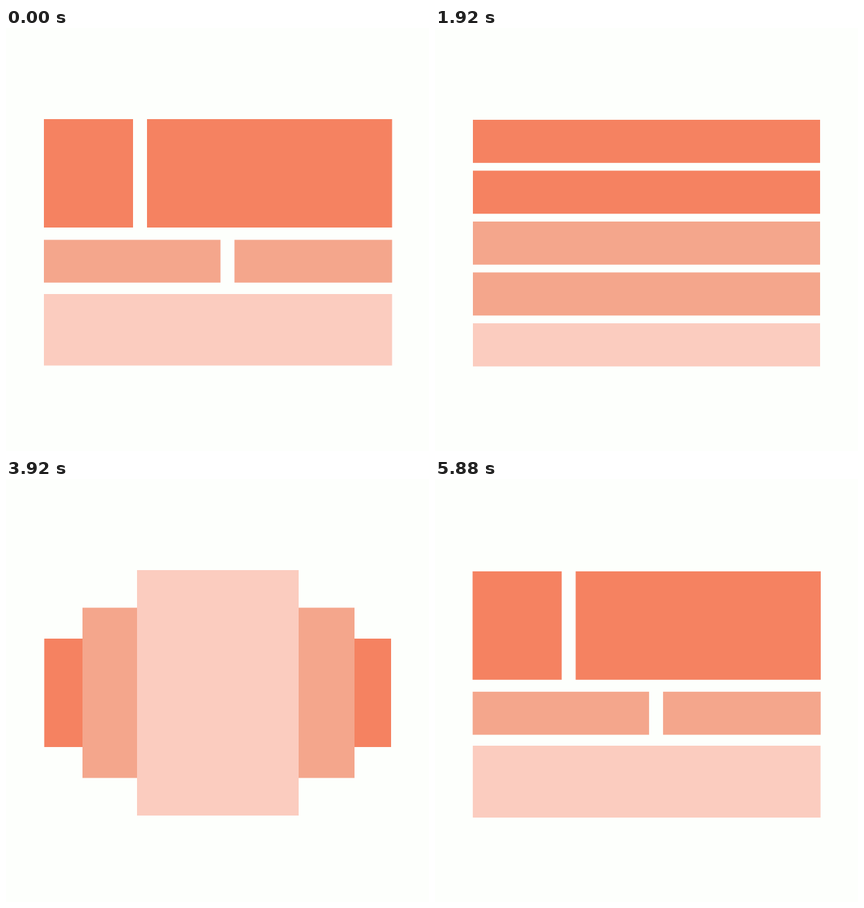
These frames come from a looping animation (636x636 px, 5.92 s). An HTML page with a canvas:

```html
<!DOCTYPE html>
<html lang="en">
<head>
<meta charset="utf-8">
<title>Layout shuffle</title>
<style>
  html, body { margin: 0; width: 100%; height: 100%; overflow: hidden; background: #fdfffc; }
  canvas { display: block; }
</style>
</head>
<body>
<canvas id="stage" width="636" height="636"></canvas>
<script>
const ctx = document.getElementById('stage').getContext('2d');
const LOOP = 5920, STEP = 40, MOVE = 760;
const DARK = '#f58261', MID = '#f4a68c', LIGHT = '#fbccbf';
const colors = [DARK, DARK, MID, MID, LIGHT];

// Layout: a box is [left, top, right, bottom].
const LEFT = 57, RIGHT = 580.5, MIDDLE = 321.5, GAP = 21;
const box = (left, right, top, height) => [left, top, right, top + height];
const split = (cut, top, height) => [
  box(LEFT, cut - GAP / 2, top, height),
  box(cut + GAP / 2, RIGHT, top, height)
];
const centred = (left, right, height) => box(left, right, MIDDLE - height / 2, height);

const grid = [...split(201.5, 137, 163), ...split(333, 318.5, 64.3), box(LEFT, RIGHT, 400, 107.5)];
const rows = [0, 1, 3, 2, 4].map(i => box(LEFT, RIGHT - 1.5, 138 + 76.5 * i, 64.8));
const stack = [
  centred(LEFT + 0.5, 191, 163), centred(210, RIGHT - 1.5, 163),
  centred(115, 259, 256), centred(290, 524, 256),
  centred(197, 440, 369)
];
const settled = grid.map(([l, t, r, b]) => [l - 0.5, t + 1.6, r - 0.5, b + 1.6]);

// In each move one box also stretches: burst is a short widening,
// wide, tall and shift swell and fade more slowly.
const moves = [
  { start: 1163, from: grid, to: rows, who: 4, burst: 18, wide: 0, tall: 3, shift: 0 },
  { start: 3163, from: rows, to: stack, who: 3, burst: 60, wide: 2, tall: 13, shift: 35 },
  { start: 5157, from: stack, to: settled, who: 4, burst: 0, wide: -10, tall: 23.5, shift: 0 }
];

// cubic-bezier(1, 0, .38, 1)
function ease(x) {
  if (x <= 0) return 0;
  if (x >= 1) return 1;
  let lo = 0, hi = 1;
  for (let i = 0; i < 24; i++) {
    const s = (lo + hi) / 2, q = 1 - s;
    if (3 * s * q * q + 1.14 * s * s * q + s * s * s < x) lo = s; else hi = s;
  }
  return lo * lo * (3 - 2 * lo);
}

const quick = t => t < 400 ? Math.sin(Math.PI * t / 400) ** 2 : 0;
const slow = t => t < 700 ? Math.sin(Math.PI * (t / 700) ** 0.6) : 0;

function stretch([l, t, r, b], move, time) {
  const s = slow(time);
  const dx = move.burst * quick(time) + move.wide * s, dy = move.tall * s, shift = move.shift * s;
  return [l + shift - dx, t - dy, r + shift + dx, b + dy];
}

function pose(time) {
  const move = moves.filter(m => time >= m.start).pop();
  if (!move) return grid;
  const t = time - move.start, e = ease(t / MOVE);
  return move.from.map((from, i) => {
    const now = from.map((v, k) => v + (move.to[i][k] - v) * e);
    return i === move.who ? stretch(now, move, t) : now;
  });
}

function draw(time) {
  ctx.fillStyle = '#fdfffc';
  ctx.fillRect(0, 0, 636, 636);
  pose(time).forEach(([l, t, r, b], i) => {
    ctx.fillStyle = colors[i];
    ctx.fillRect(l, t, r - l, b - t);
  });
}

let origin;
function tick(now) {
  origin ??= now;
  const time = Math.max(0, now - origin) % LOOP;
  draw(Math.floor(time / STEP) * STEP);
  requestAnimationFrame(tick);
}
draw(0);
requestAnimationFrame(tick);
</script>
</body>
</html>
```
